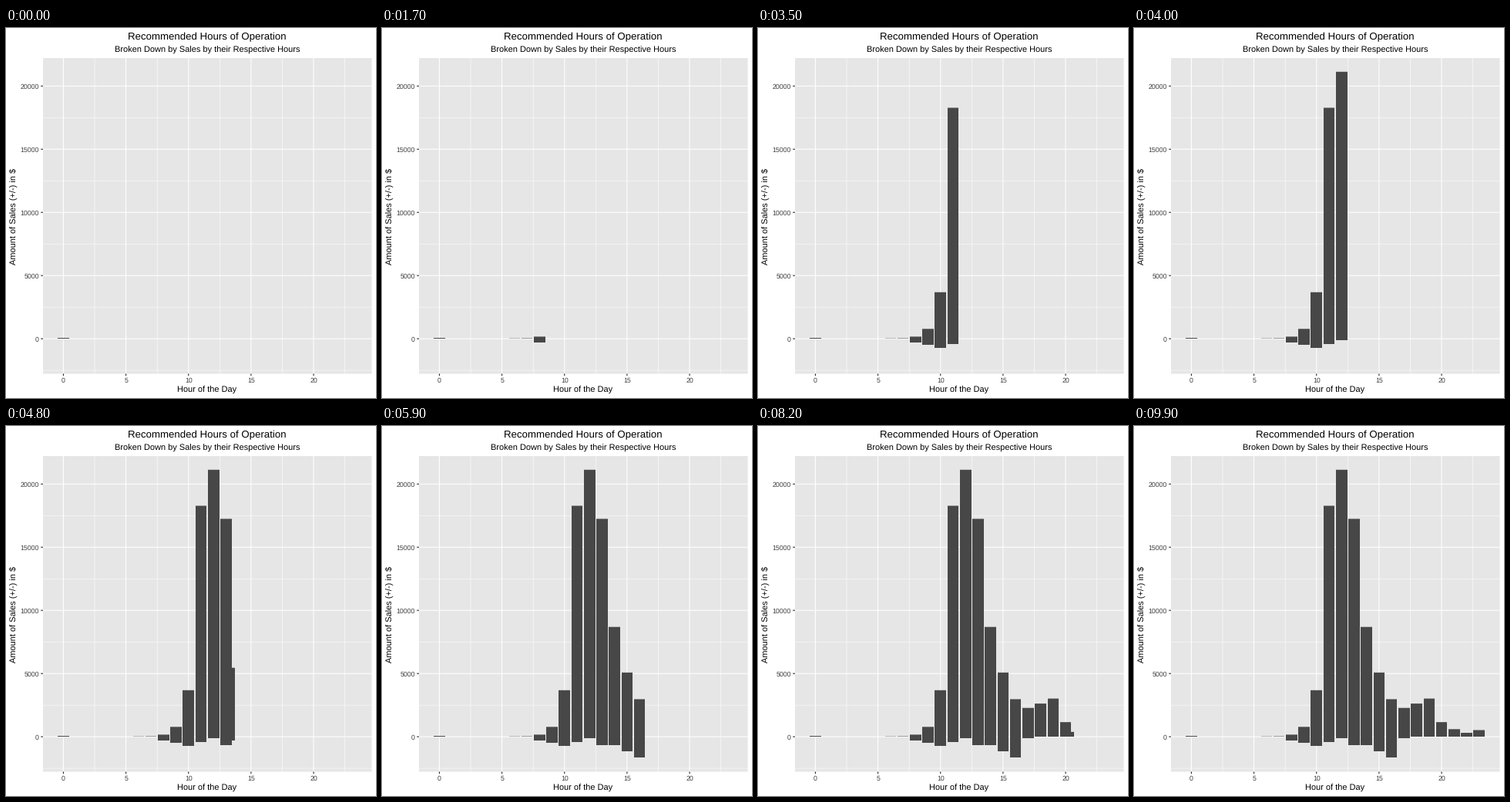
A matplotlib script that plays this animation: 480x480 px, repeating every 10 s.

```python
import matplotlib.pyplot as plt
import numpy as np
from matplotlib.animation import FuncAnimation
from matplotlib.patches import Rectangle

plt.rcParams["font.family"] = "Liberation Sans"
plt.rcParams["text.hinting"] = "none"

SIZE, DPI = 480, 72
LEFT, RIGHT, TOP, BOTTOM = 48, 474.5, 39, 448.5
PANEL, BAR, TICK, LABEL = "#e6e6e6", "#474747", "#232323", "#3d3d3d"
HALF = 0.45  # half a bar's width, in hours
HOURS = [0, *range(6, 24)]

# Key points: gains run geometrically between them, losses linearly
GAINS = {0: 65, 6: 25, 7: 35, 10: 3680, 11: 18280, 12: 21130, 13: 17245,
         14: 8690, 16: 2970, 17: 2280, 19: 3020, 20: 1155, 22: 310, 23: 525}
LOSSES = {7: 0, 8: 285, 10: 720, 12: 110, 13: 655, 14: 655,
          16: 1625, 17: 110, 18: 0}


def curve(hour, keys):
    return np.interp(hour, list(keys), list(keys.values()))


def sales(hour):
    logs = {h: np.log(v) for h, v in GAINS.items()}
    return np.array([-curve(hour, LOSSES), np.exp(curve(hour, logs))])


def px(hour):
    return 74.45 + 16.23 * hour


def py(value):
    return 403.1 - 0.01639 * value


def lerp(a, b, t):
    return a + (b - a) * t


def place(rect, hour, span):
    left, right = round(px(hour - HALF)), round(px(hour + HALF))
    top, bottom = py(span[1]), round(py(span[0]))
    rect.set_bounds(left, top, right - left, bottom - top)


fig = plt.figure(figsize=(SIZE / DPI, SIZE / DPI), dpi=DPI, facecolor="white")
ax = fig.add_axes([0, 0, 1, 1])
ax.set_xlim(0, SIZE)
ax.set_ylim(SIZE, 0)
ax.axis("off")


def line(x, y, color, width, z):
    ax.plot(x, y, color=color, lw=width, zorder=z, snap=False,
            solid_capstyle="butt")


def text(x, y, s, size, color="black", **kw):
    kw = {"ha": "center", "va": "baseline", **kw}
    ax.text(x, y, s, fontsize=size, color=color, **kw)


def new_bar():
    rect = Rectangle((0, 0), 0, 0, fc=BAR, lw=0, zorder=3, snap=False)
    return ax.add_patch(rect)


ax.add_patch(Rectangle((LEFT, TOP), RIGHT - LEFT, BOTTOM - TOP,
                       fc=PANEL, lw=0, zorder=0, snap=False))

for k in range(5):
    x, y = px(5 * k), py(5000 * k)
    mid_x, mid_y = px(5 * k + 2.5), py(5000 * k - 2500)
    line([mid_x, mid_x], [TOP, BOTTOM], "white", 0.53, 1)
    line([LEFT, RIGHT], [mid_y, mid_y], "white", 0.53, 1)
    line([x, x], [TOP, BOTTOM], "white", 1.07, 2)
    line([LEFT, RIGHT], [y, y], "white", 1.07, 2)
    line([x, x], [BOTTOM, BOTTOM + 2.74], TICK, 1.07, 2)
    line([LEFT - 2.74, LEFT], [y, y], TICK, 1.07, 2)
    text(x, 460, str(5 * k), 8.8, LABEL)
    text(43, y + 3.4, str(5000 * k), 8.8, LABEL, ha="right")

text(261, 15, "Recommended Hours of Operation", 13.2)
text(261, 32, "Broken Down by Sales by their Respective Hours", 11)
text(261, 473, "Hour of the Day", 11)
text(13, 244, "Amount of Sales (+/-) in $", 11, rotation=90,
     rotation_mode="anchor")

bars = [new_bar() for _ in HOURS]
for rect, hour in zip(bars, HOURS):
    place(rect, hour, sales(hour))
mover = new_bar()


def timing(move):
    """First frame and number of frames of a move; early ones are slower."""
    start = 2 + 6 * min(move, 6) + 5 * max(move - 6, 0) - (move > 8)
    return start, 3 if move < 6 else 2


def move_bar(move, t):
    a, b = HOURS[move], HOURS[(move + 1) % len(HOURS)]
    span_a, span_b = sales(a), sales(b)
    ratio = span_b[1] / span_a[1]
    # only the part that both hours share travels
    span = lerp(span_a * min(1, ratio ** 2), span_b * min(1, ratio ** -2), t)
    place(mover, lerp(a, b, t), span)


def update(frame):
    shown = 1
    mover.set_visible(False)
    for move in range(len(HOURS)):
        start, count = timing(move)
        if frame >= start + count:
            shown = move + 2
        elif frame >= start:
            move_bar(move, (frame - start + 0.5) / count)
            mover.set_visible(True)
    for i, rect in enumerate(bars):
        rect.set_visible(i < shown)
    return [*bars, mover]


anim = FuncAnimation(fig, update, frames=100, interval=100,
                     init_func=lambda: update(0), repeat=True,
                     repeat_delay=0, blit=False)
plt.show()
```
